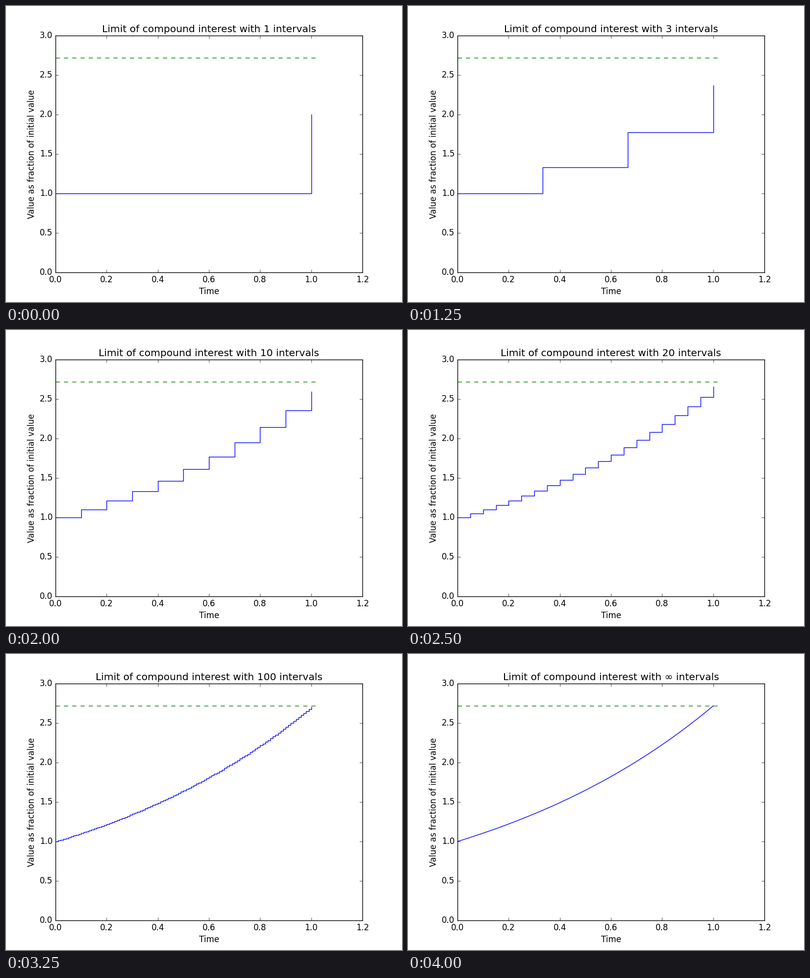
These frames come from a looping animation (800 by 600 pixels, 5000 ms). A matplotlib script:

```python
import numpy as np
import matplotlib.pyplot as plt
from matplotlib.animation import FuncAnimation

plt.style.use("classic")
plt.rcParams["font.family"] = "DejaVu Sans"

INTERVAL = 250  # ms
INFINITE = 0
# (number of compounding intervals, ticks it stays on screen)
HOLDS = [(1, 3), (2, 2)]
HOLDS += [(n, 1) for n in (3, 4, 6, 10, 15, 20, 30, 50, 100, 150, 250)]
HOLDS += [(INFINITE, 4)]
schedule = [n for n, ticks in HOLDS for _ in range(ticks)]

fig = plt.figure(figsize=(8, 6), dpi=100, facecolor="white")
ax = fig.add_axes([0.125, 0.1, 0.775, 0.8])
ax.set_xlim(0, 1.2)
ax.set_ylim(0, 3)
ax.set_xlabel("Time")
ax.set_ylabel("Value as fraction of initial value")

curve, = ax.plot([], [], "b-")
ax.plot([0, 1.02], [np.e, np.e], "g--")
title = ax.set_title("")


def growth(n):
    """Return times, values and draw style for n compounding intervals."""
    if n == INFINITE:
        t = np.linspace(0, 1, 101)
        return t, np.exp(t), "default"
    k = np.arange(n + 1)
    return k / n, (1 + 1 / n) ** k, "steps-post"


def update(tick):
    n = schedule[tick]
    t, value, style = growth(n)
    curve.set_drawstyle(style)
    curve.set_data(t, value)
    count = "\u221e" if n == INFINITE else n
    title.set_text(f"Limit of compound interest with {count} intervals")
    return curve, title


anim = FuncAnimation(fig, update, frames=len(schedule), interval=INTERVAL,
                     repeat=True, repeat_delay=0, blit=False)
plt.show()
```
